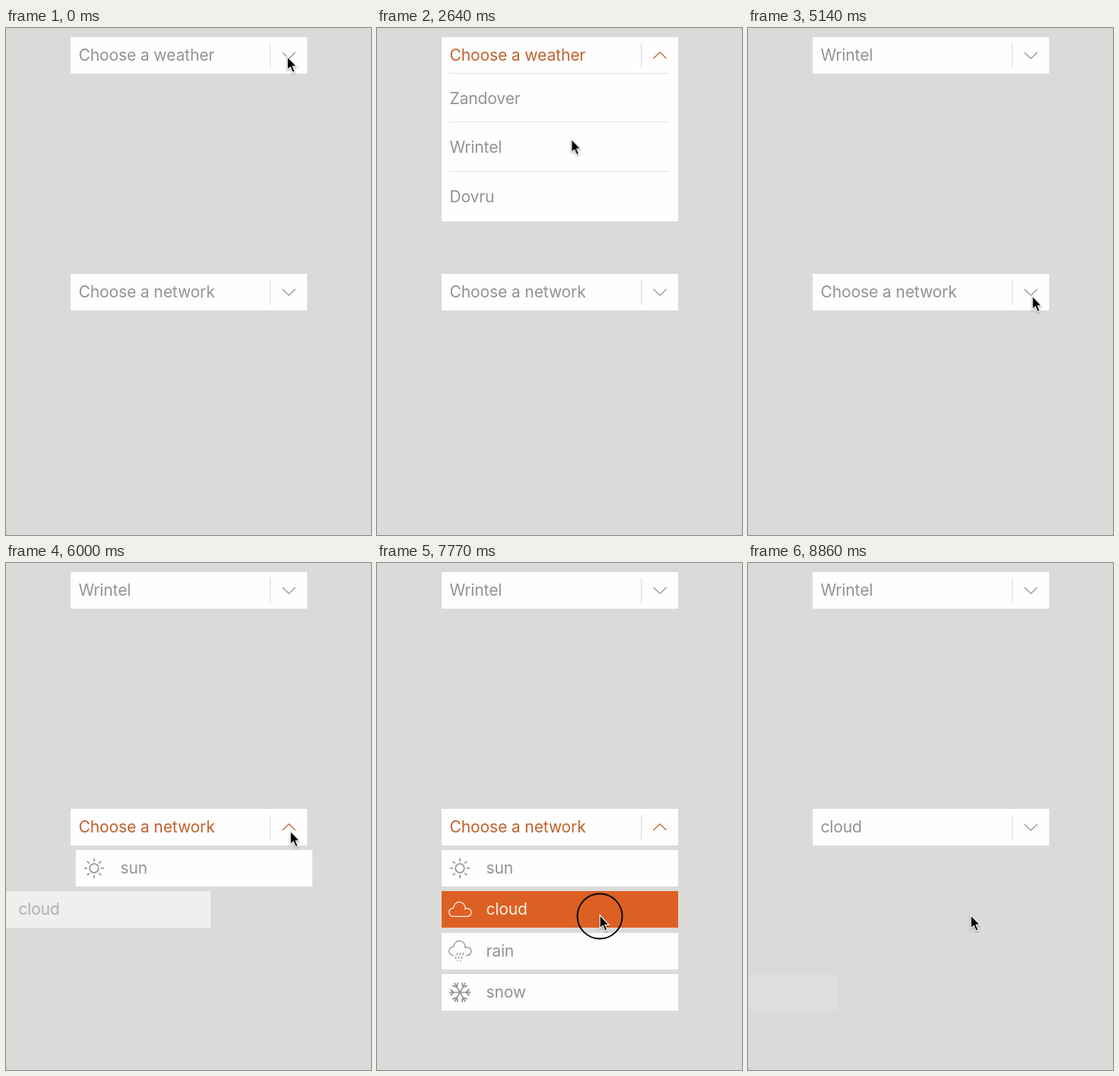
These frames come from a looping animation (480x666 px, 8.96 s). An HTML page:

```html
<!DOCTYPE html>
<html lang="en">
<head>
<meta charset="utf-8">
<title>Dropdowns</title>
<style>
  html, body { margin: 0; width: 100%; height: 100%; overflow: hidden; }
  body { position: relative; background: #dbdad8; color: #929292; font: 21px Inter, "Liberation Sans", sans-serif; letter-spacing: -.1px; }
  ul { margin: 0; padding: 0; list-style: none; }
  .drop { position: absolute; left: 85px; width: 311px; }
  #weather { top: 12px; }
  #network { top: 323px; }
  .head, li { position: relative; box-sizing: border-box; background: #fefefe; white-space: nowrap; }
  .head { height: 47.5px; line-height: 48px; }
  .head span { position: absolute; left: 10.4px; }
  .head::after { content: ""; position: absolute; left: 262px; top: 8px; width: 1px; height: 32px; background: #d9d9dc; }
  .head svg { position: absolute; left: 277px; top: 14px; }
  li { opacity: 0; }
  #weather li { height: 64.7px; padding-left: 10.4px; line-height: 65px; }
  #weather li:first-child::before, #weather li:not(:last-child)::after {
    content: ""; position: absolute; left: 10px; right: 11px; height: 1px; background: #e3e3e6;
  }
  #weather li::before { top: -1px; }
  #weather li::after { bottom: 0; }
  #network li { height: 48px; margin-top: 6.4px; padding-left: 58.4px; line-height: 48px; }
  li svg { position: absolute; left: 8px; top: 8px; }
  svg { fill: none; stroke: currentColor; stroke-width: 1.25; overflow: visible; }
  .bold { stroke-width: 1.7; }
  #cursor { position: absolute; left: 0; top: 0; }
  #ring { stroke: #0a0a0a; stroke-width: 2; }
  #arrow { fill: #000; stroke: #fff; stroke-width: 1.2; filter: drop-shadow(0 1px 1px rgba(0, 0, 0, .4)); }
</style>
</head>
<body>
<section class="drop" id="weather">
  <div class="head"><span>Choose a weather</span><span>Wrintel</span>
    <svg width="20" height="20"><path d="M1.5 6 10 14.2 18.5 6"/></svg></div>
  <ul><li>Zandover</li><li>Wrintel</li><li>Dovru</li></ul>
</section>
<section class="drop" id="network">
  <div class="head"><span>Choose a network</span><span>cloud</span>
    <svg width="20" height="20"><path d="M1.5 6 10 14.2 18.5 6"/></svg></div>
  <ul>
    <li><svg class="bold" width="32" height="32" viewBox="-16 -16 32 32"><circle r="5.8"/><g id="rays"></g></svg>sun</li>
    <li><svg width="32" height="32" viewBox="-16 -16 32 32"><path d="M-9.8 9.3H9.6A5.3 5.3 0 1 0 7-.6A7.75 7.75 0 1 0-8.4-1.6A5.5 5.5 0 0 0-9.8 9.3Z"/></svg>cloud</li>
    <li><svg width="32" height="32" viewBox="-16 -16 32 32"><path d="M-8 5.3H-9.8A5.5 5.5 0 0 1-8.4-5.6A7.75 7.75 0 1 1 7-4.6A5.3 5.3 0 1 1 9.6 5.3H8"/><path d="M-3 2-4 5M1 2 0 5M5 2 4 5M-5 7-6 10M-1 7-2 10M3 7 2 10M-3 11.5-3.5 13M1 11.5 .5 13"/></svg>rain</li>
    <li><svg class="bold" width="32" height="32" viewBox="-16 -16 32 32"><g id="flake" transform="rotate(30)"></g></svg>snow</li>
  </ul>
</section>
<svg id="cursor" width="1" height="1">
  <circle id="ring" cy="1" r="29.5"/>
  <path id="arrow" d="M0-.5V17L4 13.4 6.9 20.4 9.9 19.1 7 12.4H12.2Z"/>
</svg>
<script>
const LOOP = 8960, LAST = 8860, SLIDE = 400, WIDTH = 311;
const GREY = '#929292', RUST = '#c0602c', ORANGE = '#dc6023', WHITE = '#fefefe', CREAM = '#fdf1e8';
const IN = 'cubic-bezier(.35,.2,.25,1.18)', OUT = 'cubic-bezier(.75,-.18,.65,.8)';
const HARD = 'step-end', SOFT = 'ease-in-out';

// Each step is [ms, style, easing towards the next step].
function play(el, steps) {
  const all = [[0, steps[0][1]], ...steps, [LOOP, steps[steps.length - 1][1]]];
  el.animate(all.map(([ms, style, easing = 'linear']) => ({ ...style, easing, offset: ms / LOOP })),
    { duration: LOOP, iterations: Infinity });
}

// A value that changes at given times, with a short fade.
function fade(el, first, changes, span) {
  const steps = [];
  let now = first;
  for (const [ms, next] of changes) {
    steps.push([ms, now, 'ease'], [ms + span, next]);
    now = next;
  }
  play(el, steps);
}

const slid = p => ({ transform: `translateX(${-WIDTH * (1 - p)}px)`, opacity: p });

function dropdown(id, open, openGap, close, closeGap) {
  const root = document.getElementById(id);
  const [label, choice] = root.querySelectorAll('span');
  const on = { opacity: 1 }, off = { opacity: 0 };
  const head = open - 40;
  play(label, [[0, on, HARD], [close, off]]);
  play(choice, [[0, off, HARD], [close, on]]);
  fade(root.querySelector('.head'), { color: GREY }, [[head, { color: RUST }], [close, { color: GREY }]], 120);
  fade(root.querySelector('.head svg'), { transform: 'rotate(0deg)' },
    [[head, { transform: 'rotate(180deg)' }], [close, { transform: 'rotate(0deg)' }]], 200);
  root.querySelectorAll('li').forEach((row, i) => {
    const a = open + i * openGap, b = close + i * closeGap;
    const cut = b + SLIDE > LAST;
    play(row, [
      [a, slid(0), IN], [a + SLIDE, slid(1)],
      [b, slid(1), OUT], [cut ? LAST : b + SLIDE, slid(cut ? .106 : 0)]
    ]);
  });
}

function hover(row, from, to) {
  const idle = { color: GREY, backgroundColor: WHITE }, lit = { color: CREAM, backgroundColor: ORANGE };
  fade(row, idle, [[from, lit], [to, idle]], 80);
}

function spokes(id, count, d) {
  document.getElementById(id).innerHTML = Array.from({ length: count },
    (_, i) => `<path d="${d}" transform="rotate(${i * 360 / count})"/>`).join('');
}

spokes('rays', 8, 'M0-9V-13');
spokes('flake', 6, 'M0 0V-14.5M-4-12.5 0-8 4-12.5');

dropdown('weather', 234, 300, 2910, 120);
dropdown('network', 5670, 200, 7910, 200);

const rows = document.querySelectorAll('#network li');
hover(rows[0], 6985, 7120);
hover(rows[1], 7140, 8350);

const at = (x, y) => ({ transform: `translate(${x}px,${y}px)` });
play(document.getElementById('cursor'), [
  [1600, at(370, 38), SOFT], [2700, at(255, 147)],
  [4070, at(255, 147), SOFT], [4950, at(355, 347), 'ease-out'], [5140, at(374, 352.5)],
  [6800, at(374, 352.5), SOFT], [7360, at(293, 463)]
]);

const presses = [50, 2770, 5450, 7770];
play(document.getElementById('ring'), [[0, { opacity: 0 }, HARD],
  ...presses.flatMap(ms => [[ms, { opacity: 1 }, HARD], [ms + 140, { opacity: 0 }, HARD]])]);
</script>
</body>
</html>
```
